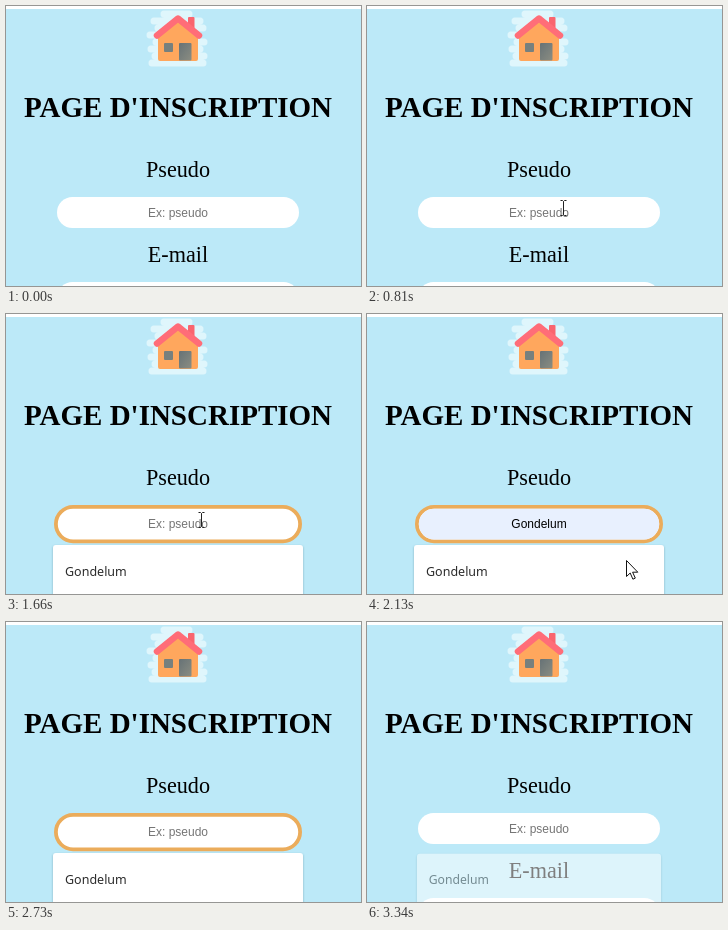
An HTML page for the animation above (3410 ms loop, 355 by 280 pixels).

```html
<!DOCTYPE html>
<html lang="fr">
<head>
<meta charset="utf-8">
<title>Page d'inscription</title>
<style>
html, body { margin: 0; width: 100%; height: 100%; overflow: hidden; background: #bce9f8; }
svg { display: block; width: 355px; height: 280px; }
text { text-anchor: middle; }
.title { font: bold 29px "Liberation Serif", "Times New Roman", serif; }
.label { font: 22.2px "Liberation Serif", "Times New Roman", serif; }
.field { font: 12px "Liberation Sans", Arial, sans-serif; }
.hint { fill: #757575; }
.item { font: 12.5px "Noto Sans", "Open Sans", sans-serif; fill: #2b2b2b; text-anchor: start; }

.idle, .focus, .caret, .value, .halo, .list, .pointer, .arrow, .beam, .email {
  animation: 3410ms step-end infinite;
}
.idle { animation-name: idle; }
.focus { animation-name: focus; }
.email { animation-name: email; }
.caret { animation-name: caret; }
.value { animation-name: value; }
.halo { animation-name: halo; mix-blend-mode: multiply; }
.list { animation-name: list; transform-origin: 172px 262px; }
.pointer { animation-name: move; }
.arrow { animation-name: arrow; }
.beam { animation-name: beam; }

@keyframes idle { 0%, 95.601%, 100% { opacity: 1 } 33.724% { opacity: 0 } }
@keyframes focus { 0%, 95.601%, 100% { opacity: 0 } 33.724% { opacity: 1 } }
@keyframes email { 0%, 95.601%, 100% { transform: none } 33.724% { transform: translateY(7px) } }
@keyframes caret {
  0%, 48.68%, 80.058%, 100% { opacity: 0 }
  33.724%, 64.516% { opacity: 1 }
}
@keyframes value { 0%, 68.914%, 100% { opacity: 0 } 62.463% { opacity: 1 } }
@keyframes halo { 0%, 36.07%, 100% { opacity: 0 } 33.724% { opacity: 1 } }
@keyframes list {
  0%, 100% { opacity: 0; transform: none }
  36.07% { opacity: 1; transform: none }
  95.601% { opacity: .86; transform: scale(.993) }
  97.653% { opacity: .5; transform: scale(.976) }
}
@keyframes move {
  0%, 100% { transform: translate(360px, 290px) }
  3.812% { transform: translate(334px, 254px) }
  5.865% { transform: translate(319px, 230px) }
  7.917% { transform: translate(302px, 206px) }
  9.97% { transform: translate(286px, 181px) }
  12.023% { transform: translate(271px, 162px) }
  14.076% { transform: translate(258px, 152px) }
  16.129% { transform: translate(233px, 153px) }
  18.181% { transform: translate(211px, 159px) }
  19.648% { transform: translate(205px, 169px) }
  21.7% { transform: translate(200px, 182px) }
  23.753% { transform: translate(196px, 202px) }
  25.806% { transform: translate(195px, 206px) }
  58.357% { transform: translate(204px, 214px) }
  60.41% { transform: translate(228px, 232px) }
  62.463% { transform: translate(259px, 246px) }
  64.516% { transform: translate(288px, 254px) }
  66.568% { transform: translate(311px, 259px) }
  68.914% { transform: translate(319px, 270px) }
  70.381% { transform: translate(360px, 290px) }
}
@keyframes arrow { 0%, 60.41%, 100% { opacity: 1 } 23.753% { opacity: 0 } }
@keyframes beam { 0%, 60.41%, 100% { opacity: 0 } 23.753% { opacity: 1 } }
</style>
</head>
<body>
<svg viewBox="0 0 355 280">
  <defs>
    <filter id="shadow" x="-5%" y="-10%" width="110%" height="120%">
      <feDropShadow dx="0" dy="1" stdDeviation="1" flood-color="#24505f" flood-opacity=".4"/>
    </filter>
    <linearGradient id="door" x2="1" y2="1">
      <stop stop-color="#667276"/>
      <stop offset="1" stop-color="#8b8d82"/>
    </linearGradient>
  </defs>
  <rect width="355" height="280" fill="#bce9f8"/>
  <rect width="355" height="3" fill="#fff"/>

  <g class="house">
    <path d="M158 8H183M148 15H194M152 22H197M144 29H192M150 36H198M145 43H194M149 50H198M146 57H197"
      stroke="#dff6fc" stroke-width="7" stroke-linecap="round"/>
    <rect x="182" y="11" width="6.5" height="14" rx="1" fill="#f9656f"/>
    <path d="M152 30L172 14L192 30V53Q192 55 190 55H154Q152 55 152 53Z" fill="#ffa75d"/>
    <path d="M151 29.5L172 12.5L193 29.5" fill="none" stroke="#ff6d78" stroke-width="6.5"
      stroke-linecap="round" stroke-linejoin="round"/>
    <rect x="158" y="37" width="9" height="9" rx="1" fill="#77807e"/>
    <rect x="173" y="37" width="12.5" height="17.5" rx="1" fill="url(#door)"/>
  </g>

  <text class="title" x="172" y="111">PAGE D'INSCRIPTION</text>
  <text class="label" x="172" y="171">Pseudo</text>

  <g class="email">
    <text class="label" x="172" y="256">E-mail</text>
    <rect x="51" y="276" width="242" height="31" rx="15.5" fill="#fff"/>
  </g>

  <g class="idle">
    <rect x="51" y="191" width="242" height="31" rx="15.5" fill="#fff"/>
    <text class="field hint" x="172" y="211">Ex: pseudo</text>
  </g>

  <g class="focus">
    <rect x="49.9" y="192.9" width="244.2" height="34.4" rx="17.2" fill="#fff" stroke="#ebac5b" stroke-width="3.8"/>
    <text class="field hint" x="172" y="214">Ex: pseudo</text>
  </g>
  <g class="value">
    <rect x="51.8" y="194.8" width="240.4" height="30.6" rx="15.3" fill="#e8f0fe"/>
    <text class="field" x="172" y="214">Gondelum</text>
  </g>
  <rect class="caret" x="172" y="203" width="1" height="14"/>

  <g class="list">
    <rect x="47" y="231" width="250" height="62" rx="3" fill="#fff" filter="url(#shadow)"/>
    <text class="item" x="59" y="262">Gondelum</text>
  </g>

  <circle class="halo" cx="194" cy="206" r="12" fill="#faf04e"/>
  <g class="pointer">
    <path class="arrow" d="M.5 .5V16.5L4.2 13L6.9 19.2L9.3 18.1L6.6 12.2H11.8Z" fill="#fff" stroke="#111"/>
    <path class="beam" d="M-2.5 -7.5H-.5L.5 -6.5L1.5 -7.5H3.5M.5 -6.5V6.5M-2.5 7.5H-.5L.5 6.5L1.5 7.5H3.5"
      fill="none" stroke="#222"/>
  </g>
</svg>
</body>
</html>
```
